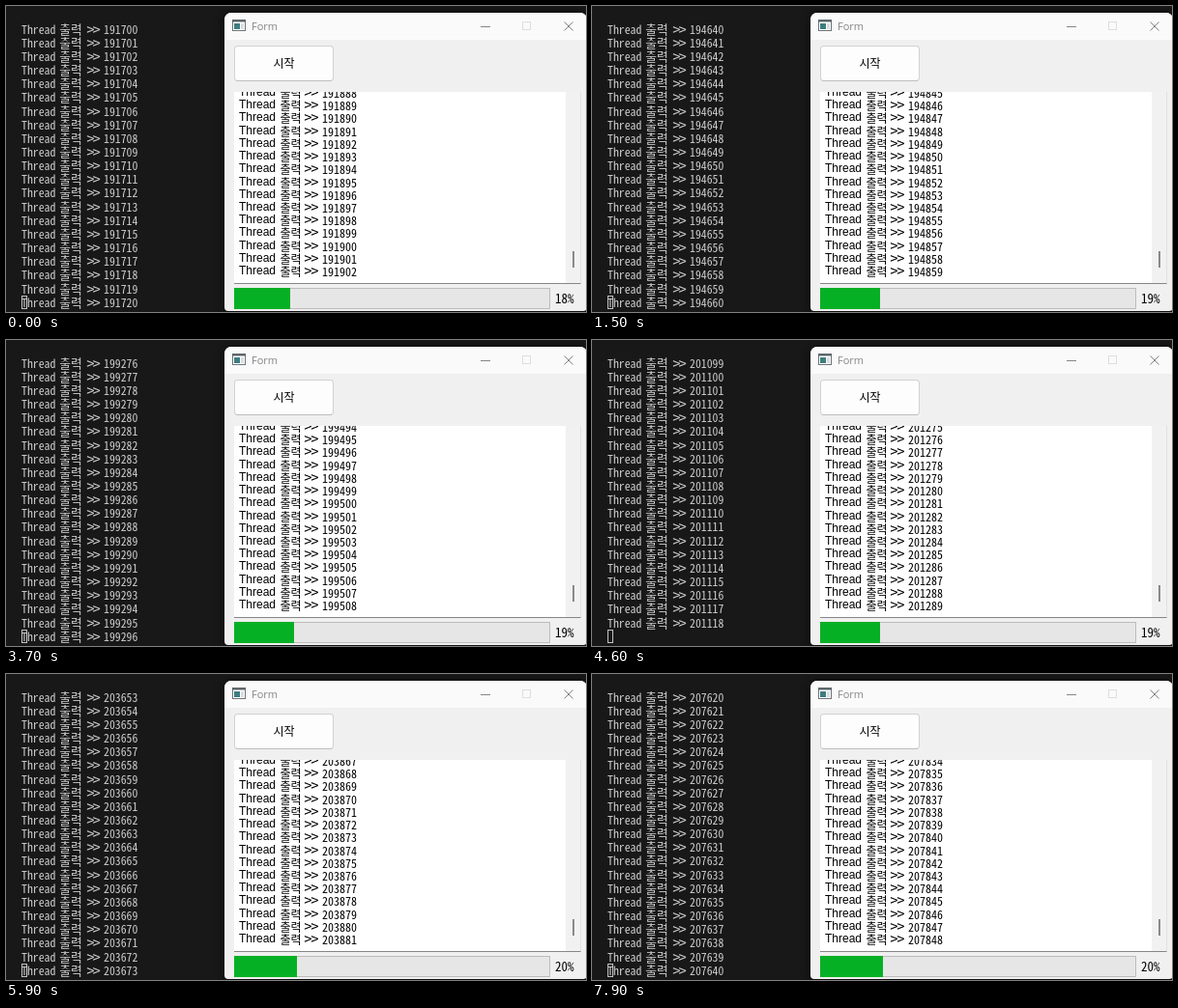
An HTML page for the animation above (8 s loop, 600 by 317 pixels).

```html
<!DOCTYPE html>
<html lang="ko">
<head>
<meta charset="utf-8">
<title>Thread output</title>
<style>
html, body { margin: 0; width: 100%; height: 100%; overflow: hidden; background: #181818; }
#stage { position: relative; width: 600px; height: 317px; overflow: hidden; background: #181818;
  font: 12px "Noto Sans Mono CJK KR", "Noto Sans CJK KR", "Noto Sans CJK", monospace; color: #000; }
#stage div, #stage svg { position: absolute; box-sizing: border-box; }
.rows div { top: 0; white-space: pre; font-variant-ligatures: none; }
.rows .arrows { top: -1px; font-size: 16px; }

#term { left: 16px; top: 16.6px; line-height: 14.15px; font-size: 11.8px; color: #cfcfcf; }
#term .label { left: 39.3px; font-size: 12.8px; }
#term .arrows { left: 67.5px; letter-spacing: -1.8px; }
#term .number { left: 85px; }
#cursor { left: 16px; top: 300px; width: 6px; height: 14px; border: 1px solid #c4c4c4; }

#win { left: 226px; top: 7px; width: 375px; height: 309px; border-radius: 7px 7px 4px 4px;
  background: #f0f0f0; box-shadow: 0 2px 10px 2px rgba(0, 0, 0, .45); overflow: hidden; }
#bar { left: 0; top: 0; width: 100%; height: 28px; background: #fafafa; }
#title { left: 28px; top: 6px; color: #858585; font: 11px/16px "Open Sans", "Noto Sans", sans-serif; }
#button { left: 10px; top: 34px; width: 103px; height: 37px; border: 1px solid #d2d2d2;
  border-bottom-color: #bdbdbd; border-radius: 4px; background: #fdfdfd;
  line-height: 34px; text-align: center; }
#list { left: 10px; top: 82px; width: 359px; height: 199px; background: #f1f1f1;
  border-right: 1px solid #e2e2e2; border-bottom: 1px solid #868686; overflow: hidden; }
#paper { left: 0; top: 0; width: 343px; height: 198px; background: #fff; overflow: hidden; }
#log { left: 5px; top: -6.1px; line-height: 13.23px; }
#log .word { font-family: "Liberation Sans", Arial, sans-serif; }
#log .label { left: 42.4px; }
#log .arrows { left: 67.5px; letter-spacing: -1px; }
#log .number { left: 86px; }
#thumb { left: 350px; top: 165px; width: 2px; height: 17px; background: #8a8a8a; }
#track { left: 10px; top: 285px; width: 327px; height: 22px; border: 1px solid #bcbcbc; background: #e6e6e6; }
#fill { left: -1px; top: -1px; height: 22px; background: #06b025; }
#percent { left: 342px; top: 288px; font-size: 13px; line-height: 16px; }
</style>
</head>
<body>
<div id="stage">
  <div id="term" class="rows"></div>
  <div id="cursor"></div>
  <div id="win">
    <div id="bar"></div>
    <svg width="374" height="27" style="left:1px;top:1px" fill="none">
      <rect x="7.5" y="6.5" width="13" height="11" fill="#fff" stroke="#6c7478"/>
      <path d="M7 7.5h14" stroke="#59646a" stroke-width="2"/>
      <rect x="9" y="10" width="6" height="6" fill="#3f7d80"/>
      <path d="M16 11h3M16 13h3M16 15h3" stroke="#b5bcc0"/>
      <path d="M264 13.5h10" stroke="#858585"/>
      <rect x="307.5" y="8.5" width="8" height="8" stroke="#dedede"/>
      <path d="M350.5 8.5l9 9m0-9l-9 9" stroke="#858585"/>
    </svg>
    <div id="title">Form</div>
    <div id="button">시작</div>
    <div id="list">
      <div id="paper"><div id="log" class="rows"></div></div>
      <div id="thumb"></div>
    </div>
    <div id="track"><div id="fill"></div></div>
    <div id="percent"></div>
  </div>
</div>
<script>
const LOOP = 8000, STEP = 100, TOTAL = 1012500, TRACK = 327;
const TERM_ROWS = 21, LOG_ROWS = 15;
const EMPTY_PROMPT = 46; // step where the cursor waits on a fresh line

// time in ms, first number in the terminal, last number in the form
const KEYS = [
  [0, 191700, 191902],
  [1500, 194640, 194859],
  [2500, 196841, 197058],
  [3700, 199276, 199508],
  [4600, 201099, 201289],
  [5900, 203653, 203881],
  [7900, 207620, 207848]
];

const COLUMNS = {
  word: () => "Thread",
  label: () => "출력",
  arrows: () => ">>",
  number: n => n
};

const el = id => document.getElementById(id);
const fill = el("fill"), percent = el("percent");

// Returns a function that fills the columns with numbered rows.
function makeRows(parent) {
  const columns = Object.entries(COLUMNS).map(([name, text]) => {
    const node = document.createElement("div");
    node.className = name;
    parent.append(node);
    return { node, text };
  });
  return (first, size) => {
    for (const { node, text } of columns)
      node.textContent = Array.from({ length: size }, (_, i) => text(first + i)).join("\n");
  };
}

const showTerm = makeRows(el("term")), showLog = makeRows(el("log"));

function count(time, column) {
  let i = 0;
  while (i < KEYS.length - 2 && time >= KEYS[i + 1][0]) i++;
  const a = KEYS[i], b = KEYS[i + 1];
  const part = (time - a[0]) / (b[0] - a[0]);
  return Math.round(a[column] + (b[column] - a[column]) * part);
}

function draw(step) {
  const time = step * STEP;
  const last = count(time, 2);
  const done = Math.floor(last / TOTAL * 100);
  showTerm(count(time, 1), TERM_ROWS - (step === EMPTY_PROMPT ? 1 : 0));
  showLog(last - LOG_ROWS + 1, LOG_ROWS);
  fill.style.width = Math.floor(TRACK * done / 100) + "px";
  percent.textContent = done + "%";
}

const start = performance.now();
let shown = -1;

function tick(now) {
  const step = Math.floor(Math.max(0, now - start) % LOOP / STEP);
  if (step !== shown) draw(shown = step);
  requestAnimationFrame(tick);
}
tick(start);
</script>
</body>
</html>
```
